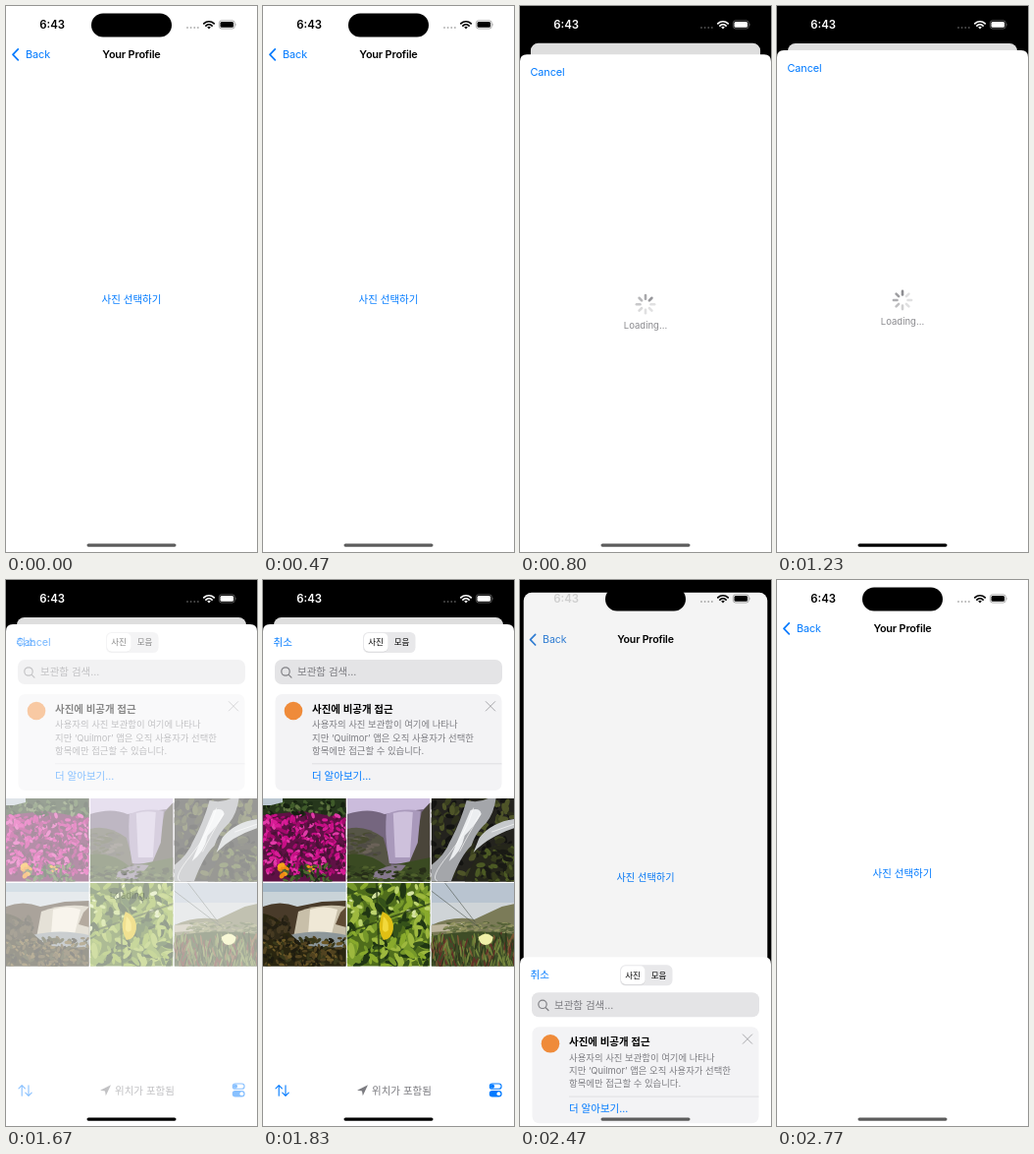
An HTML page for the animation above (3.02 s loop, 256 by 555 pixels).

```html
<!DOCTYPE html>
<html lang="ko">
<head>
<meta charset="utf-8">
<style>
  html, body { margin: 0; width: 100%; height: 100%; overflow: hidden; background: #000; }
  svg { display: block; }
  #stage { width: 100%; height: 100%; }
  text { font: 10.5px Inter, 'Noto Sans CJK KR', 'Noto Sans CJK', sans-serif; white-space: pre; }
  .latin { font-size: 10.9px; letter-spacing: -.01em; }
  .title { font-weight: 600; letter-spacing: -.015em; }
  .mid { text-anchor: middle; }
  .blue { fill: #007aff; }
  .grey { fill: #7c7c81; }
  .line { fill: none; stroke-linecap: round; stroke-linejoin: round; }
  .body { font-size: 9.4px; }
  .tab { font-size: 8.5px; font-weight: 500; text-anchor: middle; }
</style>
</head>
<body>
<svg id="stage" viewBox="0 0 256 555" preserveAspectRatio="none">
  <rect width="256" height="555"/>

  <g id="page">
    <rect id="paper" width="256" height="555" fill="#fff"/>
    <g id="back">
      <path class="line" d="M12.3 43.8 7 49.3l5.3 5.5" stroke="currentColor" stroke-width="1.7"/>
      <text class="latin" x="20" y="53" fill="currentColor">Back</text>
    </g>
    <text class="latin title mid" x="128" y="53">Your Profile</text>
    <text id="choose" class="blue mid" x="128" y="302">사진 선택하기</text>
  </g>
  <rect id="dim" width="256" height="555"/>

  <g id="sheet">
    <path d="M0 520V7Q0 0 7 0H249Q256 0 256 7V520Z" fill="#fff"/>
    <g id="loading">
      <text class="latin blue" x="10.5" y="22.2">Cancel</text>
      <g id="spinner" transform="translate(128 254)"></g>
      <text class="mid" x="128" y="279" fill="#8a8a8e" style="font-size:9.5px">Loading...</text>
    </g>
    <g id="picker">
      <text id="cancel" class="blue" x="10.5" y="22">취소</text>
      <rect x="102" y="8" width="53.5" height="21" rx="5.5" fill="#e8e8ea"/>
      <rect x="103" y="9.5" width="24.5" height="19" rx="4.8" fill="#d4d4d6"/>
      <rect x="103" y="9" width="24.5" height="18.7" rx="4.8" fill="#fff"/>
      <text class="tab" x="115" y="21.3">사진</text>
      <text class="tab" x="141.5" y="21.3">모음</text>

      <rect x="12" y="36" width="232" height="25" rx="7" fill="#e4e4e6"/>
      <path class="line" d="M26 51.2l3 3M27.2 48a4.2 4.2 0 1 1-8.4 0a4.2 4.2 0 1 1 8.4 0" stroke="#808085" stroke-width="1.2"/>
      <text class="grey" x="35" y="52.3">보관함 검색...</text>

      <rect x="12.5" y="71" width="231" height="98" rx="7" fill="#f3f3f5"/>
      <circle cx="31" cy="88" r="9.3" fill="#ef8b3a"/>
      <text x="50" y="90.2" style="font-weight:600">사진에 비공개 접근</text>
      <path class="line" d="M227.3 78.6l9.4 9.4m0-9.4l-9.4 9.4" stroke="#a0a0a4" stroke-width=".9"/>
      <text class="grey body" x="50" y="105.3">사용자의 사진 보관함이 여기에 나타나</text>
      <text class="grey body" x="50" y="118.5">지만 ‘Quilmor’ 앱은 오직 사용자가 선택한</text>
      <text class="grey body" x="50" y="131.7">항목에만 접근할 수 있습니다.</text>
      <path d="M50 141.8H243.5" stroke="#d6d6d9" stroke-width=".7"/>
      <text class="blue" x="50" y="158">더 알아보기...</text>

      <g id="photos"></g>

      <g class="line" stroke="#007aff" stroke-width="1.1">
        <path d="M16.2 479.3v-10.6m-3.2 3.2 3.2-3.2 3.2 3.2M23 468.7v10.6m-3.2-3.2 3.2 3.2 3.2-3.2"/>
        <rect x="231.3" y="467" width="11.8" height="5.3" rx="2.65"/>
        <rect x="231.3" y="474.6" width="11.8" height="5.3" rx="2.65" fill="#007aff"/>
      </g>
      <circle cx="234" cy="469.7" r="2.1" fill="#007aff"/>
      <circle cx="240.4" cy="477.2" r="1.9" fill="#fff"/>
      <path d="M96 473.8 107 468.3 101.8 479.3 101 474.6Z" fill="#7c7c81"/>
      <text class="grey" x="111" y="477.7">위치가 포함됨</text>
    </g>
  </g>

  <rect x="87" y="7.5" width="82" height="24" rx="12"/>
  <text id="clock" x="34.3" y="23.2" fill="currentColor" style="font-size:11.4px;font-weight:600">6:43</text>
  <g id="icons" fill="currentColor">
    <path class="line" d="M185 22h.01m3.6 0h.01m3.6 0h.01m3.6 0h.01" stroke="currentColor" stroke-opacity=".3" stroke-width="1.9"/>
    <g class="line" stroke="currentColor" stroke-width="1.7" stroke-linecap="butt">
      <path d="M201.8 17.9a7.4 7.4 0 0 1 10.4 0M203.9 20.2a4.5 4.5 0 0 1 6.2 0"/>
    </g>
    <path d="M205.2 21.6a2.6 2.6 0 0 1 3.6 0L207 23.4Z"/>
    <rect x="217.3" y="14.8" width="16" height="8.2" rx="2.6" fill="none" stroke="currentColor" stroke-opacity=".4" stroke-width=".8"/>
    <rect x="218.5" y="16" width="13.6" height="5.8" rx="1.6"/>
    <path d="M234.4 17.5q1.3 1.4 0 2.8Z" fill-opacity=".4"/>
  </g>
  <rect id="home" x="82.5" y="546.5" width="91" height="3.2" rx="1.6"/>
</svg>

<script>
const LOOP = 3020;
const $ = id => document.getElementById(id);

// ---- photo thumbnails, each painted on an 84.5 square ----
function scatter(seed, count, colors, [x, y, w, h], rx, ry, tilt = 180) {
  const random = () => (seed = seed * 16807 % 2147483647) / 2147483647;
  random();
  let out = '';
  for (let i = 0; i < count; i++) {
    const cx = (x + w * random()).toFixed(1), cy = (y + h * random()).toFixed(1);
    const size = .6 + .7 * random(), turn = (tilt * (random() - .5)).toFixed(0);
    const color = colors[Math.floor(random() * colors.length)];
    out += `<ellipse cx="${cx}" cy="${cy}" rx="${(rx * size).toFixed(1)}" ry="${(ry * size).toFixed(1)}" fill="${color}" transform="rotate(${turn} ${cx} ${cy})"/>`;
  }
  return out;
}
const shape = (d, fill, opacity = 1) => `<path d="${d}" fill="${fill}" opacity="${opacity}"/>`;
const ground = fill => shape('M0 0H85V85H0Z', fill);

const photos = [
  // magenta flowers
  ground('#5f1145') + shape('M0 0H85V20L40 13 0 17Z', '#26371c') +
  scatter(11, 70, ['#1d2d16', '#3f5a2a', '#152010', '#5f7440'], [0, 3, 85, 13], 3, 1.8) + shape('M0 0H20V4L8 7H0Z', '#bcc8d2') +
  scatter(23, 380, ['#c70f86', '#d81c96', '#a30a6c', '#e23aa8', '#4a1236'], [0, 17, 85, 60], 2.8, 1.5) +
  scatter(7, 60, ['#2c4420', '#1a2c16', '#4d6a30'], [18, 68, 50, 17], 3, 1.2) +
  scatter(5, 7, ['#f5a51b', '#ef8a12'], [14, 68, 13, 11], 3.2, 2.2) +
  scatter(9, 4, ['#f0981a'], [46, 69, 8, 6], 2, 1.5),
  // tall waterfall under a violet sky
  ground('#cbbcdc') + shape('M0 16Q22 9 38 16L78 11 85 4V85H0Z', '#75667f') +
  shape('M0 31Q18 26 37 40L45 68 0 85Z', '#565546') + shape('M85 4 76 14 70 45 62 65 85 75Z', '#4a453a') +
  shape('M40 16Q57 9 75 13L72 45 63 66H43Q38 40 40 16Z', '#a999bb') +
  shape('M47 15Q57 12 67 14L64 60H49Z', '#d5c8e2', .85) +
  scatter(17, 40, ['#4f4b45', '#6a6158', '#474a30'], [0, 36, 30, 24], 4, 1.4, 40) +
  shape('M0 57Q22 54 40 69L85 60V85H0Z', '#3a4a22') + shape('M28 75Q45 65 60 68L48 82H26Z', '#85788c') +
  scatter(19, 80, ['#354520', '#4f602c', '#262d18'], [0, 69, 85, 16], 3, 1.2, 40),
  // stream over mossy rocks
  ground('#24231e') + scatter(31, 170, ['#3c4220', '#2b2d1a', '#131311', '#4e5428'], [0, 0, 85, 85], 4.5, 2.4) +
  shape('M36 2Q48 5 58 0H66Q64 15 56 25Q45 35 41 48Q30 58 20 85H0V68Q14 57 19 44Q30 24 36 2Z', '#a4a6aa') +
  shape('M40 12Q50 9 51 16Q44 28 34 38Q31 54 18 64 15 85H3Q8 65 22 50Q31 30 40 12Z', '#eceef0') +
  shape('M85 21Q62 24 49 40L43 55Q58 39 85 30Z', '#c6c9cc') +
  shape('M46 58Q59 46 85 46V85H34Z', '#25261a') +
  scatter(41, 75, ['#4c5a24', '#353b1c', '#191a14'], [46, 52, 39, 33], 4, 2) +
  '<path class="line" d="M43 10Q36 35 17 58T6 84M50 16Q37 38 29 54M62 34 85 26" stroke="#fff" stroke-width=".9" opacity=".7"/>',
  // low falls behind brown bushes
  ground('#c9d3d8') + shape('M0 0H85V9H0Z', '#8faac2', .6) +
  shape('M0 24Q17 17 35 24L60 19 85 18V85H0Z', '#493b2a') +
  shape('M36 29Q60 20 85 24V61H30Z', '#c8bfa9') + shape('M48 27Q62 22 76 27L70 52H46Z', '#efe8d6') +
  shape('M85 24 79 30 74 42 85 45Z', '#5e4a33') + shape('M27 53Q55 46 85 53V67H27Z', '#8d979a') +
  shape('M0 31Q18 34 27 51L42 64 85 66V85H0Z', '#292510') +
  scatter(53, 190, ['#38381a', '#524320', '#1d1b0f', '#6b5726'], [0, 56, 85, 29], 3, 1.4) +
  scatter(59, 60, ['#463a22', '#231f13', '#322b19'], [0, 36, 26, 20], 3, 1.8),
  // lemon among leaves
  ground('#4f6d1c') + scatter(61, 190, ['#76982a', '#35521a', '#9db83e', '#203613', '#89aa2c'], [0, 0, 85, 85], 6.5, 2.6) +
  scatter(67, 22, ['#d5e3a2', '#bdd46e'], [0, 0, 85, 50], 3.2, 1.8) +
  shape('M29 0 32 85H34L31 0ZM0 49 85 20V22L0 51Z', '#263a13', .7) +
  shape('M36 29Q48 34 47 47Q45 58 37 58Q31 48 34 36Z', '#e0bf14') + shape('M37 34Q43 38 42 48Q38 52 36 47Z', '#f2d93c'),
  // dune grass and a pale flower
  ground('#b9c4d0') + shape('M0 20H85V41H0Z', '#cfd4d7') +
  shape('M0 43Q22 33 44 37L72 24 85 21V85H0Z', '#7b7b58') + shape('M0 43 35 40 30 48 0 50Z', '#bdb59e') +
  scatter(71, 110, ['#6f784a', '#91925f', '#566238'], [14, 40, 71, 13], 3, 1, 60) +
  shape('M0 54Q40 46 85 52V85H0Z', '#3e4d27') +
  scatter(73, 240, ['#5f7030', '#2d3a1c', '#7c5634', '#76873e', '#633027'], [0, 55, 85, 30], .8, 5, 50) +
  '<path d="M0 8 50 46M14 0 45 40" stroke="#4e564d" stroke-width=".6"/>' +
  shape('M48 55Q56 48 63 55Q62 63 55 63Q49 62 48 55Z', '#f0efa8')
];
$('photos').innerHTML = photos.map((art, i) =>
  `<svg x="${i % 3 * 85.8}" y="${177 + Math.floor(i / 3) * 86}" width="84.5" height="84.5">${art}</svg>`).join('');

// ---- spinner ----
const blades = Array.from({ length: 8 }, (_, i) => {
  $('spinner').insertAdjacentHTML('beforeend',
    `<rect x="-1.3" y="-10.4" width="2.6" height="6.2" rx="1.3" fill="#3c3c43" transform="rotate(${i * 45})"/>`);
  return $('spinner').lastChild;
});

// ---- motion ----
const ramp = (t, start, length) => Math.min(1, Math.max(0, (t - start) / length));
const spring = ms => { const x = Math.max(0, ms) * .026; return 1 - (1 + x) * Math.exp(-x); };
const press = (t, start) => 1 - .6 * (ramp(t, start, 35) - ramp(t, start + 45, 50));
const mix = (a, b, k) => `rgb(${a.map((v, i) => Math.round(v + (b[i] - v) * k))})`;
const shade = level => mix([0, 0, 0], [255, 255, 255], level);

function draw(t) {
  const open = spring(t - 537) - spring(t - 2383.5);
  const scale = 1 - .086 * open;
  $('page').setAttribute('transform', `translate(${128 * (1 - scale)} ${38 * open}) scale(${scale})`);
  $('paper').setAttribute('rx', 8.5 * Math.min(1, open * 4));
  $('back').style.color = mix([0, 122, 255], [142, 142, 147], open);
  $('choose').style.opacity = press(t, 470);
  $('dim').style.opacity = .13 * open;

  $('sheet').setAttribute('transform', `translate(0 ${555 - 510 * open})`);
  const loaded = ramp(t, 1530, 300);
  $('loading').style.opacity = 1 - loaded;
  $('picker').style.opacity = loaded;
  $('cancel').style.opacity = press(t, 2300);

  const head = (t - 1230) * .015;
  blades.forEach((blade, i) => {
    const age = (((head - i) % 8) + 8) % 8;
    blade.style.opacity = .58 - .42 * Math.min(1, age / 5);
  });

  const light = ramp(t, 570, 220);
  $('clock').style.color = shade(light - ramp(t, 2430, 220));
  $('icons').style.color = shade(t < 2385 ? light : 0);
  $('home').style.fill = shade(.36 * (1 - ramp(t, 900, 300) + ramp(t, 2300, 100)));
}

const begin = performance.now();
(function tick() {
  draw((performance.now() - begin) % LOOP);
  requestAnimationFrame(tick);
})();
</script>
</body>
</html>
```
